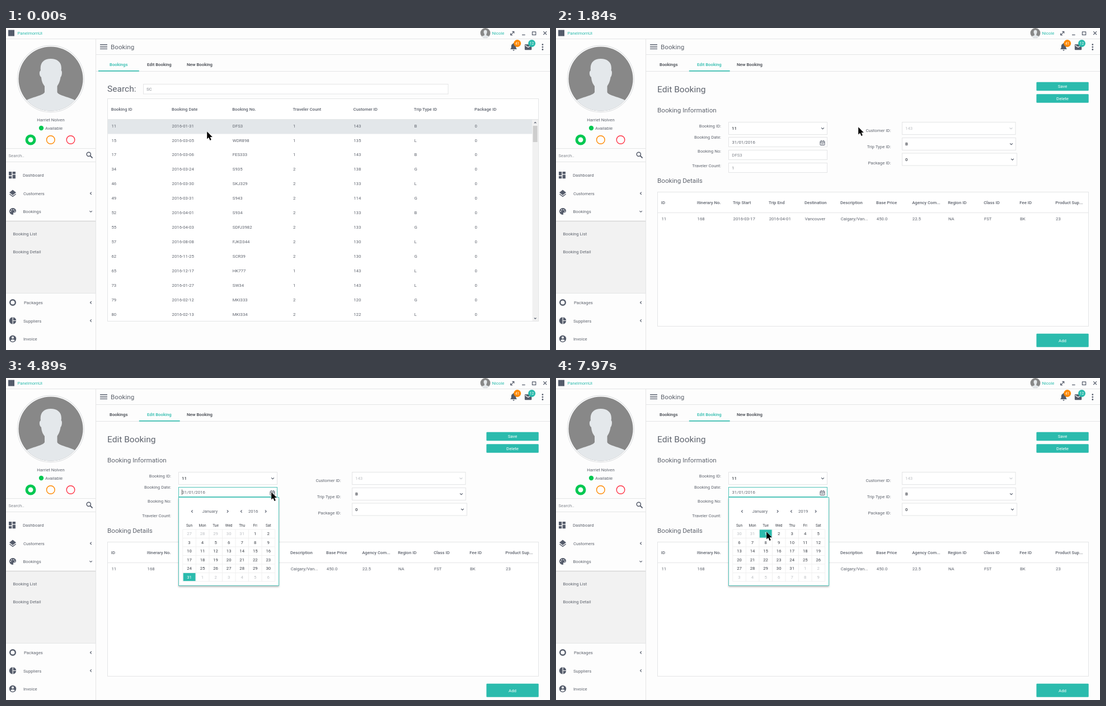
An HTML page that plays this animation: 972 px wide and 576 px high, repeating every 8 s.

```html
<!DOCTYPE html>
<html lang="en">
<head>
<meta charset="utf-8">
<title>Booking</title>
<style>
html, body { margin: 0; width: 100%; height: 100%; overflow: hidden; background: #fdfdfd; }
svg { display: block; width: 100vw; height: 100vh; }
text { font-family: Roboto, sans-serif; font-size: 7.78px; fill: #5f646e; white-space: pre; }
.b { font-weight: 500; }
.dark { fill: #3c4048; }
.soft { fill: #84888f; }
.pale { fill: #bcbfc3; }
.teal { fill: #2bbbad; }
.white { fill: #fff; }
.h1 { font-size: 15.55px; }
.h2 { font-size: 11.66px; }
.tiny { font-size: 6.48px; }
.mid { text-anchor: middle; }
.end { text-anchor: end; }
.ico { fill: #555c6b; }
.line { fill: none; stroke: #e4e5e6; }
.focus { fill: none; stroke: #2bbbad; stroke-width: .8; }
.panel { fill: #fff; stroke: #2bbbad; stroke-width: .8; filter: drop-shadow(0 2.5px 1.4px #0004); }
.box { fill: #fff; stroke: #e4e5e6; }
.stroke { fill: none; stroke: #555c6b; }
</style>
</head>
<body>
<svg id="stage" viewBox="0 0 972 576"></svg>
<script>
const LOOP = 8000;
let css = '';

const text = (x, y, s, cls = '') => `<text x="${x}" y="${y}" class="${cls}">${s}</text>`;
const rect = (x, y, w, h, cls, more = '') => `<rect x="${x}" y="${y}" width="${w}" height="${h}" class="${cls}" ${more}/>`;
const disc = (x, y, r, fill, more = '') => `<circle cx="${x}" cy="${y}" r="${r}" fill="${fill}" ${more}/>`;
const path = (d, cls, more = '') => `<path d="${d}" class="${cls}" ${more}/>`;
const group = (id, ...parts) => `<g id="${id}">${parts.join('')}</g>`;
const ring = (x, y, r, color, w) => disc(x, y, r, 'none', `stroke="${color}" stroke-width="${w}"`);
const chevron = (x, y, turn, size = 2.2, color = '#555c6b') =>
  `<path d="M${-size} ${-size / 2}L0 ${size / 2}L${size} ${-size / 2}" transform="translate(${x} ${y}) rotate(${turn})" fill="none" stroke="${color}" stroke-width="1.1"/>`;
const button = (y, h, label) => rect(858.4, y, 93.3, h, 'teal', 'rx="1.3"') + text(905, y + h / 2 + 2.8, label, 'white mid');

// Stepped animation from [ms, declaration] pairs
function keys(id, steps) {
  const frames = steps.map(([t, rule]) => `${t / LOOP * 100}%{${rule}}`).join('');
  css += `@keyframes ${id}{${frames}}#${id}{animation:${id} ${LOOP}ms step-end infinite}`;
}
// Times switch the element on, off, on ...
function show(id, ...times) {
  keys(id, [[0, 'opacity:0'], ...times.map((t, i) => [t, `opacity:${1 - i % 2}`])]);
}

function avatar() {
  return `<clipPath id="round"><circle cx="80" cy="91" r="57.6"/></clipPath>
  <g id="face">${disc(80, 91, 59.6, '#fff', 'stroke="#dfe1e3" stroke-width="1.1"')}${disc(80, 91, 57.6, '#888')}
  <path clip-path="url(#round)" fill="#e4e8eb" d="M62 76C60 62 68 55 80 55C92 55 101 62 98.6 76C101 77 100 86 97.5 88C96.5 96 93.5 101 91.5 104V115C95 122 119 124 127 132L139 155H21L33 132C41 124 65 122 69 115V104C66.5 101 63.5 96 63 88C59 86 59 77 62 76Z"/></g>`;
}

function titleBar() {
  return rect(4, 3.5, 11, 11, 'ico') + text(20.5, 12, 'PanelmornUi', 'teal')
    + '<use href="#face" transform="translate(844.1 -5.1) scale(.155)"/>'
    + text(868.5, 12, 'Nicole', 'teal')
    + path('M902 12.2L907.2 7M904.4 6.4H907.8V9.8M901.6 9.2V12.6H905', 'stroke', 'stroke-width="1.1"')
    + path('M922 12.4H927.6M940.4 7V12.4H946.6V7ZM940 6.9H947', 'stroke', 'stroke-width="1.2"')
    + path('M960.2 6.2L966 12M966 6.2L960.2 12', 'stroke', 'stroke-width="1.2"');
}

function header() {
  return path('M161 19.5H972M161 47.5H972M161 77.5H972', 'line')
    + path('M168 30H181M168 33.7H181M168 37.4H181', 'stroke', 'stroke-width="1.4"')
    + text(187, 37.8, 'Booking', 'h2')
    + path('M901 38C903 36 902.8 35 902.8 32.5C902.8 30 904.5 28.3 906.2 28V27H907.8V28C909.5 28.3 911.2 30 911.2 32.5C911.2 35 911 36 913 38ZM905.4 39H908.6C908.4 41 905.6 41 905.4 39Z', 'ico')
    + disc(913.6, 27.5, 6.5, '#ff8800') + text(913.6, 29.8, '41', 'tiny white mid')
    + rect(926.8, 29.2, 12.4, 10, 'ico', 'rx="1"') + path('M927.6 31L933 34.6L938.4 31', '', 'fill="none" stroke="#fff" stroke-width="1.2"')
    + disc(939.5, 27.5, 6.5, '#2bbbad') + text(939.5, 29.8, '12', 'tiny white mid')
    + [29.7, 34.1, 38.5].map(y => disc(958.8, y, 1.4, '#555c6b')).join('');
}

function sidebar() {
  const icons = path('M5 257H10.2V263.6H5ZM11.6 257H17V261.2H11.6ZM5 265H10.2V269.2H5ZM11.6 262.6H17V269.2H11.6Z', 'ico')
    + path('M12 289.6L18 294.3L12 299L6 294.3Z', 'ico') + path('M6.3 297L12 301.4L17.7 297', 'stroke', 'stroke-width="1.4"')
    + path('M12 322A6 6 0 1 0 12 334C13.4 334 13.4 332.6 13 331.8C12.6 330.8 13.4 330 14.4 330H15.6C17 330 18 328.8 18 327.2C18 324.2 15.4 322 12 322Z', 'ico')
    + [[8.4, 328], [10.2, 325.2], [13.8, 325.2], [15.7, 327.8]].map(p => disc(...p, .9, '#fff')).join('')
    + ring(12, 491, 4.8, '#555c6b', 2.4)
    + disc(12, 523.5, 6.2, '#555c6b') + path('M12.2 517V530M12.2 523.5H18.5', '', 'stroke="#fff" stroke-width="1.1"')
    + disc(12, 556, 6.2, '#555c6b') + disc(12, 553.8, 2, '#fff') + path('M8.2 559C9.4 556.6 14.6 556.6 15.8 559C14 561.4 10 561.4 8.2 559Z', 'white');
  const items = [[30, 266, 'Dashboard'], [31, 298.6, 'Customers'], [30.5, 331, 'Bookings'], [32, 494.2, 'Packages'], [31, 526.6, 'Suppliers'], [31, 559, 'Invoice']];
  return rect(0, 0, 161, 576, '', 'fill="#fdfdfd"') + path('M0 19.5H160M0 215.5H160M0 239.5H160', 'line')
    + avatar()
    + text(80, 167, 'Harriet Nolven', 'mid') + disc(63, 179, 4.2, '#00c851') + text(70, 182, 'Available')
    + ring(44, 200, 7, '#00c851', 5) + ring(79.8, 200, 7.3, '#ff8800', 1.4) + ring(115.5, 200, 7.3, '#ff3547', 1.4)
    + text(4.5, 230.8, 'Search..', 'soft')
    + ring(147.8, 225.8, 3.6, '#555c6b', 1.5) + path('M150.5 228.5L154.6 232.6', 'stroke', 'stroke-width="1.8"')
    + rect(0, 345, 160, 129.5, '', 'fill="#f2f2f2"') + path('M0 345.5H160', '', 'stroke="#d6d6d6" stroke-width="1.6"') + path('M0 474.5H160', 'line')
    + text(12.5, 370.6, 'Booking List') + text(12.5, 403, 'Booking Detail')
    + icons + items.map(i => text(...i)).join('')
    + chevron(151.6, 328.2, 0) + [295.8, 491.2, 523.6].map(y => chevron(151.6, y, 90)).join('')
    + path('M160.5 19V576', 'line');
}

function tabs(active) {
  return [[185, 'Bookings'], [252, 'Edit Booking'], [323, 'New Booking']]
    .map(([x, s], i) => text(x, 68, s, i === active ? 'b teal' : 'b dark')).join('')
    + rect(165 + active * 72.8, 76, 72.8, 1.6, 'teal');
}

function bookingList() {
  const head = ['Booking ID', 'Booking Date', 'Booking No.', 'Traveler Count', 'Customer ID', 'Trip Type ID', 'Package ID'];
  const rows = `11 2016-01-31 DFS3 1 143 B
15 2016-03-05 WDR898 1 135 L
17 2016-03-06 FES333 1 143 B
34 2016-03-24 S935 2 138 G
46 2016-03-30 SKJ329 2 133 L
49 2016-03-31 S943 2 114 G
52 2016-04-01 S934 2 133 B
55 2016-04-03 SDFJ3982 2 133 G
57 2016-08-08 FJKD344 2 130 L
62 2016-11-25 SCR39 2 130 G
65 2016-12-17 HK777 1 143 L
73 2016-01-27 SW34 1 143 L
79 2016-02-12 MKI333 2 120 G
80 2016-02-13 MKI334 2 122 L`.split('\n').map(r => [...r.split(' '), '0']);
  const cells = (row, i, cls) => row.map((s, c) => text(188.4 + c * 108.2, 177.6 + i * 25.92, s, cls)).join('');
  return tabs(0) + text(181, 114.3, 'Search:', 'h1') + rect(245.5, 100.5, 544.5, 17.5, 'box') + text(251, 112, 'SC', 'soft')
    + rect(181.5, 126.5, 770, 398, 'box') + path('M182 163.5H951', 'line')
    + head.map((s, c) => text(187.8 + c * 108.2, 148.4, s, 'b')).join('')
    + rect(182, 163.5, 758.5, 26, '', 'fill="#e3e7ea"')
    + rows.map((r, i) => cells(r, i, '')).join('')
    + rect(940.5, 164, 10.5, 360, '', 'fill="#f1f1f1"') + rect(941.5, 175, 8, 29, '', 'fill="#cdcdcd"')
    + chevron(945.6, 169.4, 180, 1.8) + chevron(945.6, 519.4, 0, 1.8)
    + group('picked', rect(181.5, 126.5, 770, 398, 'focus'), rect(182, 163.5, 758.5, 26, 'teal'), cells(rows[0], 0, 'white'));
}

function combo(x, y, w, value, cls = 'dark b') {
  const pale = cls === 'pale';
  return rect(x, y, w, 22, 'box') + text(x + 5.6, y + 13.8, value, cls) + chevron(x + w - 8, y + 11, 0, 2.4, pale ? '#c9ccd0' : '#555c6b');
}

function bookingForm() {
  const labels = [[295, 178.2, 'Booking ID:'], [295, 198.2, 'Booking Date:'], [295, 223.4, 'Booking No:'], [295, 248.6, 'Traveler Count:'],
    [598.3, 185.7, 'Customer ID:'], [598.3, 214.7, 'Trip Type ID:'], [598.3, 243.7, 'Package ID:']];
  const head = ['ID', 'Itinerary No.', 'Trip Start', 'Trip End', 'Destination', 'Description', 'Base Price', 'Agency Com...', 'Region ID', 'Class ID', 'Fee ID', 'Product Sup...'];
  const row = ['11', '168', '2016-03-17', '2016-04-01', 'Vancouver', 'Calgary/Van...', '450.0', '22.5', 'NA', 'FST', 'BK', '23'];
  const line = (list, x, y, cls) => list.map((s, c) => text(x + c * 64.05, y, s, cls)).join('');
  return tabs(1) + text(181, 115, 'Edit Booking', 'h1') + button(96.7, 15.6, 'Save') + button(118.2, 15.6, 'Delete')
    + text(181, 151.4, 'Booking Information', 'h2') + labels.map(l => text(...l, 'end')).join('')
    + combo(308.5, 168.5, 176, '11')
    + rect(308.5, 195.5, 176, 17, 'box') + text(314.5, 207.4, '31/01/2016')
    + rect(472, 202.4, 8, 7.2, 'stroke', 'rx=".8"') + path('M472 204.6H480M474 200.8V203M478 200.8V203M473.6 207H478.4', 'stroke')
    + rect(308.5, 218.5, 176, 17, 'box') + text(314.3, 230, 'DFS3', 'soft')
    + rect(308.5, 241.5, 176, 17, 'box') + text(314.3, 252.8, '1', 'soft')
    + combo(618.5, 168.5, 202.5, '143', 'pale') + combo(618.5, 196.5, 203, 'B') + combo(618.5, 224, 205, '0')
    + text(181, 276.5, 'Booking Details', 'h2')
    + rect(181.5, 293.5, 770, 240, 'box') + path('M182 330.5H951', 'line')
    + line(head, 187.8, 314.8, 'b') + line(row, 188.5, 344.3, '')
    + button(546.7, 24, 'Add');
}

const colX = c => 327.5 + c * 23.55;
const rowY = r => 278.6 + r * 15.5;
const cell = (c, r) => rect(colX(c) - 10.8, rowY(r) - 7.2, 21.8, 14.2, 'teal');

function month(year) {
  const first = new Date(year, 0, 1).getDay();
  let out = text(433, 241.3, year);
  for (let i = 0; i < 42; i++) {
    const n = i - first + 1, c = i % 7, r = i / 7 | 0;
    const day = n < 1 ? n + 31 : n > 31 ? n - 31 : n;
    const chosen = year === 2016 && n === 31;
    if (chosen) out += cell(c, r);
    out += text(colX(c), rowY(r) + 2.8, day, 'mid ' + (chosen ? 'white' : n === day ? 'dark' : 'pale'));
  }
  return group('y' + year, out);
}

function picker() {
  let grid = '';
  for (let c = 0; c < 8; c++) grid += `M${315.8 + c * 23.55} 270.9v93`;
  for (let r = 0; r < 7; r++) grid += `M315.8 ${270.9 + r * 15.5}h164.8`;
  return group('picker',
    rect(308.5, 195.5, 176, 17, 'focus'),
    rect(308.5, 213.5, 179, 157.8, 'panel'),
    path(grid, '', 'stroke="#f0f0f0" fill="none"'),
    group('hover', disc(464, 238.5, 11, '#e3e7ea')),
    chevron(332.5, 238.6, 90), chevron(396, 238.6, -90), chevron(420.5, 238.6, 90), chevron(464, 238.6, -90),
    group('press', disc(464, 238.5, 11, '#555'), chevron(464, 238.6, -90, 2.2, '#eee')),
    text(350.4, 241.3, 'January'),
    ['Sun', 'Mon', 'Tue', 'Wed', 'Thu', 'Fri', 'Sat'].map((d, c) => text(colX(c), 265.8, d, 'tiny dark mid')).join(''),
    [2016, 2017, 2018, 2019].map(month).join(''),
    group('day', cell(2, 0), text(colX(2), 281.4, '1', 'white mid')),
    group('caret', path('M314.5 199.5V209', '', 'stroke="#333" stroke-width=".8"')));
}

function pointer() {
  return group('pointer',
    group('arrow', path('M.2 .2V13.6L3.3 10.8L5.5 16L7.8 15L5.6 10H9.8Z', '', 'stroke="#fff" stroke-width=".8" paint-order="stroke"')),
    group('hand', path('M3 9V1.6C3 .2 5.1 .2 5.1 1.6V6C5.1 5 7.1 5 7.1 6.2C7.1 5.4 9.1 5.4 9.1 6.6C9.1 5.9 11.2 6 11.2 7.2V11C11.2 13 10 14 9.8 15.4H4.2C4 14 1 11.5 .6 9.8C.2 8.6 1.6 8.2 3 9.6Z', '', 'fill="#fff" stroke="#000"')),
    group('beam', path('M-3 -6H-.6L0 -5.4L.6 -6H3M-3 6.4H-.6L0 5.8L.6 6.4H3M0 -5.6V6', '', 'fill="none" stroke="#222"')));
}

show('list', 0, 1840);
show('edit', 1840);
show('picked', 400);
show('picker', 4610);
show('caret', 4610, 5010, 5550, 5950, 6420, 6960, 7390, 7970);
show('hover', 5680, 7110);
show('press', 5810, 5950);
show('y2016', 0, 5950);
show('y2017', 5950, 6100);
show('y2018', 6100, 6560);
show('y2019', 6560);
show('day', 7540);
show('arrow', 0, 3040, 3430, 5680, 7110);
show('beam', 3040, 3430);
show('hand', 5680, 7110);
keys('pointer', [
  [0, 359, 185], [120, 448, 177], [790, 508, 176], [910, 540, 177],
  [2120, 512, 186], [2240, 468, 189], [2370, 428, 186], [2490, 430, 181],
  [2920, 424, 187], [3040, 417, 206], [3190, 430, 208], [3310, 452, 210],
  [3430, 476, 216], [3550, 492, 214], [3670, 498, 210], [3950, 493, 208],
  [4070, 486, 205], [4190, 479, 203], [4350, 478, 202], [4890, 474, 204],
  [5010, 468, 208], [5160, 461, 219], [5280, 447, 230], [5400, 436, 234],
  [5550, 446, 236], [5680, 454, 238], [5810, 456, 238], [6960, 455, 239],
  [7110, 444, 259], [7230, 425, 271], [7390, 399, 277], [7540, 382, 276], [7690, 376, 275]
].map(([t, x, y]) => [t, `transform:translate(${x}px,${y}px)`]));

document.head.appendChild(document.createElement('style')).textContent = css;
document.getElementById('stage').innerHTML = sidebar() + titleBar() + header()
  + group('list', bookingList()) + group('edit', bookingForm()) + picker() + pointer();
</script>
</body>
</html>
```
